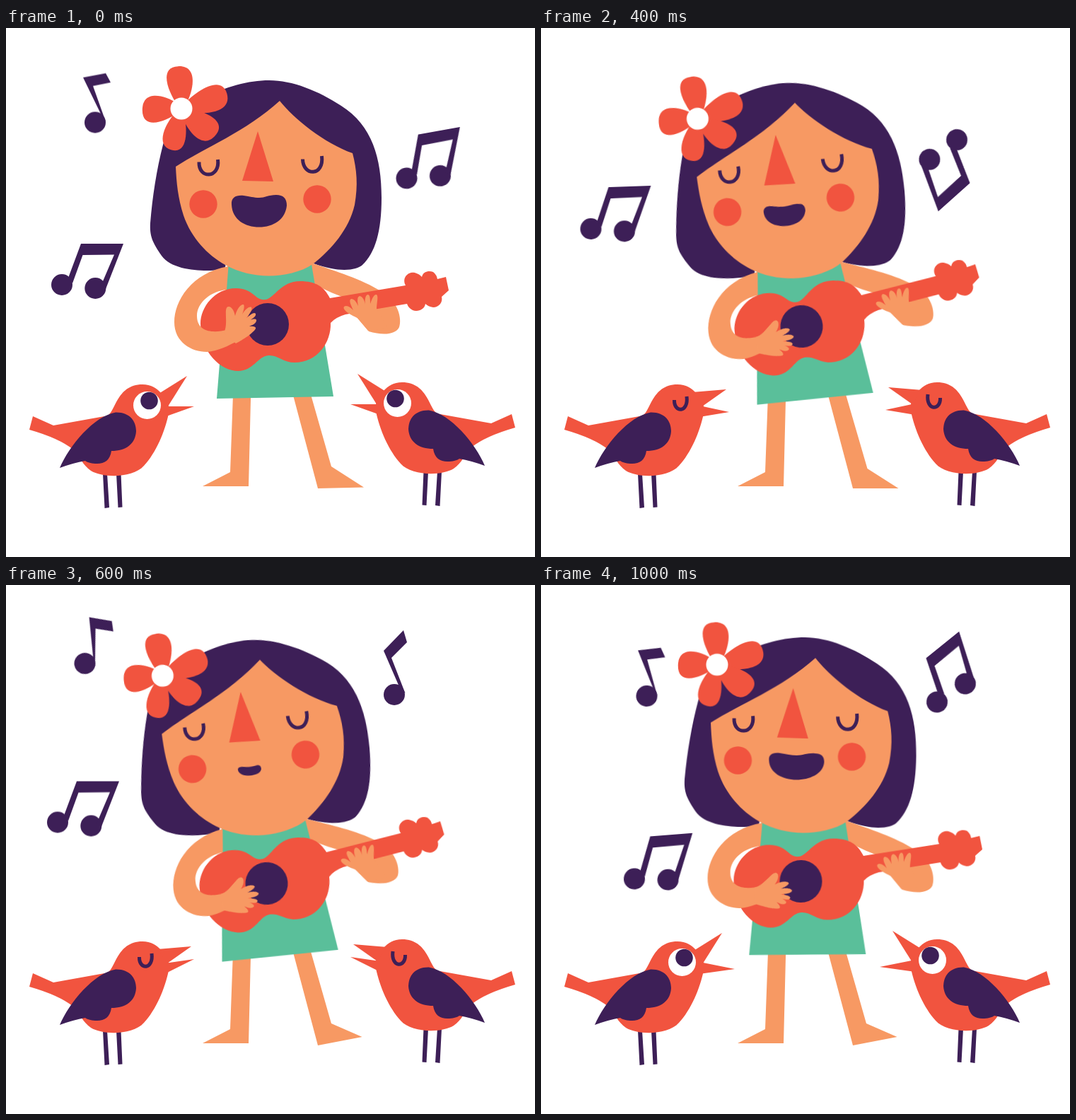
Write an HTML page that moves like this. It is 748 px wide and 748 px high and loops after 1200 ms.

```html
<!DOCTYPE html>
<html lang="en">
<head>
<meta charset="utf-8">
<title>Ukulele song</title>
<style>
  html, body { margin: 0; width: 100%; height: 100%; overflow: hidden; background: #fff; }
  svg { display: block; width: 100%; height: 100%; }
  .ink { fill: #3d1f57; }
  .red { fill: #f1543f; }
  .skin { fill: #f79963; }
  .green { fill: #5abf9a; }
  .white { fill: #fff; }
  .lid { fill: none; stroke: #3d1f57; stroke-width: 5; }

  /* every part holds its pose for one beat of 200 ms */
  .girl, .strum, .mouth, .foot, .upper, .lower, .open, .open ellipse, .shut,
  .solo, .pair-l, .pair-r, .solo-r { animation: 1200ms step-end infinite; }

  .girl { transform-origin: 370px 419px; animation-name: sway; }
  @keyframes sway {
    0% { transform: none; }
    16.666% { transform: translate(-7.5px, 0) rotate(-1.6deg); }
    33.333% { transform: translate(-1.5px, 3px) rotate(-4.8deg); }
    66.666% { transform: translate(-5.5px, 2px) rotate(-2.95deg); }
    83.333% { transform: translate(-2.5px, 0) rotate(.65deg); }
  }

  .strum { transform-origin: 309px 426px; animation-name: strum; }
  @keyframes strum {
    0% { transform: rotate(0deg); }
    33.333%, 83.333% { transform: rotate(47deg); }
    66.666% { transform: rotate(38deg); }
  }

  .mouth { animation-name: sing; }
  @keyframes sing {
    0% { d: path("M319 250C318 239 326 236 336 237C345 238 350 240 358 240C366 240 371 236 382 236C392 236 397 241 397 251C395 271 378 281.500 358 281.500C338 281.500 320 271 319 250Z"); }
    16.666%, 83.333% { d: path("M323 249C322 240 328 237 338 238C347 239 354 241 362 241C371 241 378 237 388 238C397 238 401 242 401 250C400 267 380 275.500 362 275.500C342 275.500 324 266 323 249Z"); }
    33.333%, 66.666% { d: path("M330 254C330 248 334 245 341 246C348 247 352 248 360 248C368 248 373 245 380 246C386 246 389 249 389 256C387 269 375 275.500 360 275.500C344 275.500 331 268 330 254Z"); }
    50% { d: path("M343 255C343 252 347 251 351 252C356 253 362 253 367 252C373 250 376 252 376 257C375 263 367 265 359 265C350 265 343 261 343 255Z"); }
  }

  .foot { animation-name: tap; }
  @keyframes tap {
    0% { d: path("M403.500 510L428.600 510L460 620L506 649.500L441 651Z"); }
    16.666%, 50%, 83.333% { d: path("M403.500 510L428.600 510L460 620L503.500 639L441 651Z"); }
    33.333%, 66.666% { d: path("M403.500 510L428.600 510L461.500 623L505.500 651L441 651Z"); }
  }

  .upper { animation-name: upper; }
  @keyframes upper {
    0%, 66.666% { d: path("M216 517L256 492L229 535Z"); }
    33.333% { d: path("M214 515L262 511L228 535Z"); }
  }
  .lower { animation-name: lower; }
  @keyframes lower {
    0% { d: path("M224 535L266 535L224 550Z"); }
    16.666%, 50% { d: path("M224 535L266 529L224 550Z"); }
    33.333% { d: path("M224 534L266 543L224 550Z"); }
    83.333% { d: path("M224 533L274 543L224 550Z"); }
  }

  .open { animation-name: open; }
  @keyframes open { 0%, 66.666% { visibility: visible; } 33.333% { visibility: hidden; } }
  .shut { animation-name: shut; }
  @keyframes shut { 0%, 66.666% { visibility: hidden; } 33.333% { visibility: visible; } }
  .open ellipse { animation-name: squint; }
  @keyframes squint {
    0%, 83.333% { cy: 533.5px; ry: 19.5px; }
    16.666% { cy: 530px; ry: 15.5px; }
  }

  .solo { animation-name: solo; }
  @keyframes solo {
    0% { transform: translate(126px, 133.5px); }
    16.666% { transform: translate(130px, 111px); visibility: visible; }
    33.333% { visibility: hidden; transform: none; }
    50% { transform: translate(111.5px, 111px) rotate(20.3deg); visibility: visible; }
    66.666% { transform: translate(114px, 150px) rotate(31.6deg); }
    83.333% { transform: translate(149.5px, 157px) rotate(4.1deg); }
  }
  .pair-l { animation-name: pair-l; }
  @keyframes pair-l {
    0% { transform: translate(79px, 363px); }
    16.666% { transform: translate(81px, 311px); }
    33.333% { transform: translate(70.5px, 284px) rotate(-2deg); }
    50% { transform: translate(73px, 335.5px); }
    66.666% { transform: translate(88px, 386px); }
    83.333% { transform: translate(132px, 415.5px) rotate(-4.5deg); }
  }
  .pair-r { animation-name: pair-r; }
  @keyframes pair-r {
    0% { transform: translate(566.5px, 212.5px) rotate(-10.2deg); }
    16.666% { transform: translate(557px, 244px) rotate(-10.2deg); }
    33.333% { transform: translate(588px, 158px) rotate(138.2deg); visibility: visible; }
    50% { transform: none; visibility: hidden; }
    66.666% { transform: translate(573.5px, 200.5px) rotate(-39deg); visibility: visible; }
    83.333% { transform: translate(560px, 165.5px) rotate(-39deg); }
  }
  .solo-r { animation-name: solo-r; }
  @keyframes solo-r { 0%, 66.666% { visibility: hidden; } 50% { visibility: visible; } }
</style>
</head>
<body>
<svg viewBox="0 0 748 748">
  <defs>
    <path id="petal" d="M-7 -8C-16 -22 -31 -60 -2 -60C27 -60 18 -25 8 -8Z"/>
    <g id="pair">
      <circle r="15"/>
      <circle cx="47.300" cy="5" r="15"/>
      <path d="M27 -58H87L62 6L55 2L74 -42.500L29.500 -42L15 -2L9.500 -11Z"/>
    </g>
  </defs>

  <!-- notes -->
  <g class="ink">
    <g class="solo">
      <circle r="15"/>
      <path d="M-17 -63.500L15 -69.500L22 -56.500L-3 -51.500L15 -1L10 -8Z"/>
    </g>
    <g class="pair-l"><use href="#pair"/></g>
    <g class="pair-r"><use href="#pair"/></g>
    <g class="solo-r">
      <circle cx="549" cy="155" r="15"/>
      <path d="M534 93L562 64L567 81L545 103L564.500 153L557 146Z"/>
    </g>
  </g>

  <!-- legs -->
  <g class="skin">
    <path d="M321.500 505H346.500L343 648H278L317 628Z"/>
    <path class="foot" d="M403.500 510L428.600 510L460 620L506 649.500L441 651Z"/>
  </g>

  <g class="girl">
    <path class="ink" d="M372 74C405 74 442 89 474 110C518 138 531 184 531 240C531 288 522 318 504 335C495 343 470 346 435 333L310 334C313 341 300 343 284 343C262 343 232 339 220 322C207 303 203 294 204 276C207 238 213 200 222 165C238 110 314 74 372 74Z"/>
    <path class="skin" d="M428 331C470 345 502 355 530 372C555 386 560 411 556 423C550 435 530 434 513 429L495 408L520 390C500 390 470 380 437 363L428 358Z"/>
    <path class="green" d="M314 328L431 328L463 521L298 524Z"/>

    <path class="skin" d="M387 103C407 128 450 163 490 177C496 200 498 222 493 250C485 285 460 313 435 333C417 346 392 350 372 350.500C350 350 330 346 310 335C285 321 262 297 251 265C243 240 241 218 240 196C280 170 340 146 387 103Z"/>
    <path class="red" d="M356 146L378 217L334 216Z"/>
    <circle class="red" cx="279" cy="249" r="19.700"/>
    <circle class="red" cx="440" cy="242" r="19.700"/>
    <path class="lid" d="M273 189.500C272 214 303 213 299.500 186"/>
    <path class="lid" d="M419.500 185.500C420 210 450 210 446.500 181"/>
    <path class="ink mouth" d="M319 250C318 236 340 236 358 240C376 236 397 236 397 251C395 292 320 292 319 250Z"/>

    <g transform="translate(248 114)">
      <g class="red">
        <use href="#petal" transform="rotate(-2.500)"/>
        <use href="#petal" transform="rotate(73) scale(1 1.130)"/>
        <use href="#petal" transform="rotate(130) scale(1 1.020)"/>
        <use href="#petal" transform="rotate(195) scale(.88 1)"/>
        <use href="#petal" transform="rotate(270) scale(1.040 .920)"/>
      </g>
      <circle class="white" r="15.500"/>
    </g>

    <!-- ukulele -->
    <path class="red" d="M458 382L565 364C559 352 570 344 578 346Q585 348 588 352C590 344 598 343 604 345Q609 349 610 355L622 352L626 371L616 380C618 388 612 395 604 395Q597 394 593 390C592 398 582 402 575 399Q569 396 567 390L526 397L480 405Q466 409 459 417C460 445 440 473 408 473C392 473 384 462 371 463C356 464 350 485 328 485C305 485 275 460 275 418C275 395 295 368 325 368C350 368 352 386 367 384C380 382 388 358 416 358C438 358 450 366 458 382Z"/>
    <circle class="ink" cx="370" cy="419" r="30"/>

    <g class="skin">
      <path d="M497 410C488 406 475 399 478 394C482 391 488 396 491 399C488 392 484 385 488 383C493 383 496 389 498 393C497 387 496 380 500 379C505 380 507 386 508 391C507 385 508 377 512 377C515 378 515 384 515 390C517 384 520 376 524 377C527 379 524 390 524 397L540 425L512 428Z"/>
      <path d="M314.500 337C262 346 238 386 238 416C238 444 262 458 284 458C300 457 315 449 328 442L312 427C296 431 270 432 270 407C270 388 290 372 312 370Z"/>
      <path class="strum" d="M308 431C315 418 307 396 314 394C320 393 323 402 324 407C326 398 332 390 336 391C338 394 335 402 334 405C338 398 344 393 347 395C349 399 343 406 340 410C346 405 351 401 353 404C354 408 349 410 346 413C350 411 355 411 354 414C353 419 347 420 344 422C349 421 354 422 353 425C350 431 335 441 325 446Z"/>
    </g>
  </g>

  <g id="bird">
    <path class="ink" d="M137 630H143L146 678L139.500 679ZM156 630H162.500L164.500 677.500L158.500 678Z"/>
    <path class="red" d="M38 549L67 562L142 548.500C155 546 155 504 193 504C205 504 213 509 219 516C228 526 232 534 230 545C225 570 212 601 195 619C180 636 138 637 120 626C108 618 105 606 95 596Q75 580 33 568Z"/>
    <path class="red upper" d="M216 517L256 492L229 535Z"/>
    <path class="red lower" d="M224 535L266 535L224 550Z"/>
    <path class="ink" d="M76 622C90 590 124 549 155 543.500C175 543 184 556 184 570C183 588 170 598 149 598C147 612 138 617 126 616Q116 615 112 612Q95 615 76 622Z"/>
    <g class="open">
      <ellipse class="white" cx="199.500" cy="533.500" rx="19.500" ry="19.500"/>
      <circle class="ink" cx="202.500" cy="527" r="12.300"/>
    </g>
    <path class="lid shut" d="M188.500 526C188 545 209 544 206 521"/>
  </g>
</svg>
<script>
  // the second bird mirrors the first
  const bird = document.getElementById('bird');
  const twin = bird.cloneNode(true);
  twin.id = 'twin';
  twin.setAttribute('transform', 'matrix(-1 0 0 1 753 -3)');
  bird.after(twin);
</script>
</body>
</html>
```
